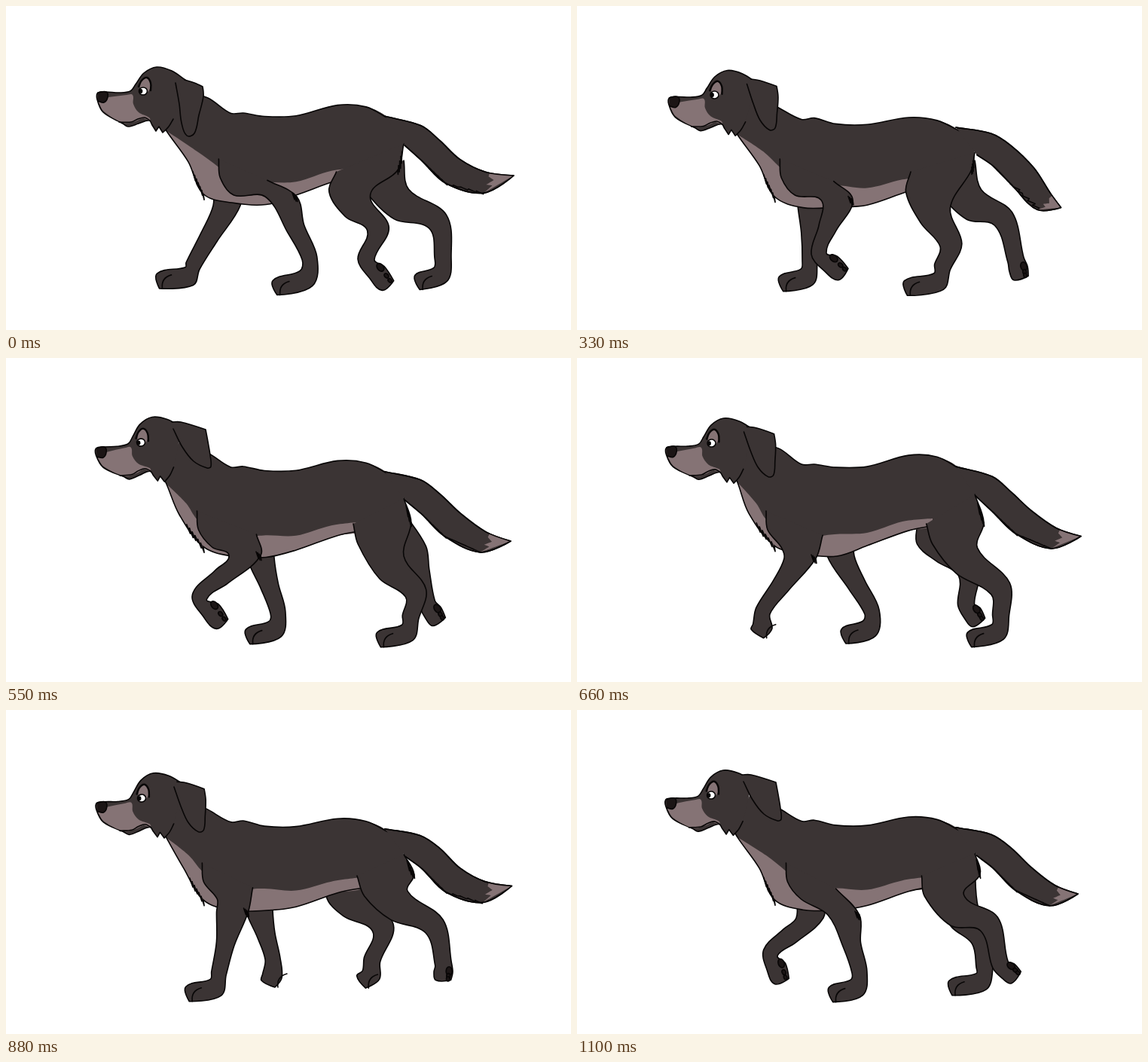
An HTML page with a canvas for the animation above (1.21 s loop, 750x430 px).

```html
<!DOCTYPE html>
<html lang="en">
<head>
<meta charset="utf-8">
<title>Walking dog</title>
<style>
html, body { margin: 0; width: 100%; height: 100%; overflow: hidden; background: #fff; }
canvas { display: block; }
</style>
</head>
<body>
<canvas id="stage" width="750" height="430"></canvas>
<script>
const ctx = document.getElementById('stage').getContext('2d');
const COAT = '#3b3434', TAN = '#857375', DARK = '#1b1515', INK = '#080606';
const STEP = 110, STEPS = 11;

// Joint positions at the key steps of the walk; steps between are interpolated.
const keySteps = [0, 2, 4, 5, 7, 9, 10];
const tracks = {
  // dx, dy, turn, how far the ear is flung back
  head: [[0, 0, 0, 0], [1, 2, .07, 0], [0, 8, -.13, 1], [-3, -1, -.1, 1], [-4, 1, -.03, .15], [0, 7, -.12, 1], [-4, 0, -.06, 1]],
  tailTip: [[674, 225], [658, 247], [627, 288], [670, 243], [668, 230], [675, 237], [665, 244]],
  // elbow, wrist, toe
  nearFore: [
    [365,253, 403,335, 357,374], [356,255, 353,338, 385,366], [334,260, 289,319, 322,346], [317,262, 257,317, 287,353],
    [275,270, 237,354, 192,379], [326,266, 328,345, 290,375], [354,272, 375,348, 337,378]],
  farFore: [
    [293,265, 248,345, 202,365], [300,255, 297,340, 253,367], [321,265, 321,338, 289,371], [338,265, 361,338, 321,370],
    [362,260, 422,336, 387,369], [310,270, 286,324, 309,358], [309,276, 257,322, 272,360]],
  // thigh, hock, ankle, toe
  nearHind: [
    [467,265, 494,296, 478,336, 507,371], [470,272, 476,314, 462,345, 412,374], [482,284, 517,321, 508,348, 461,375], [512,278, 544,312, 537,344, 495,374],
    [523,260, 580,300, 588,339, 547,374], [521,259, 557,274, 573,335, 614,343], [505,266, 547,284, 562,338, 583,355]],
  farHind: [
    [525,263, 573,286, 580,334, 546,367], [526,259, 575,282, 601,336, 577,367], [528,268, 557,283, 564,338, 602,355], [537,258, 548,285, 559,326, 575,350],
    [450,252, 493,285, 474,328, 492,352], [475,262, 508,294, 498,335, 451,370], [515,275, 538,305, 541,342, 496,369]]
};

const pairs = a => a.reduce((out, v, i) => (i % 2 ? out.at(-1).push(v) : out.push([v]), out), []);
const lerp = (a, b, k) => a.map((v, i) => v + (b[i] - v) * k);

function sample(track, t) {
  const i = keySteps.findLastIndex(s => s <= t);
  const from = keySteps[i], to = keySteps[i + 1] ?? STEPS;
  return lerp(track[i], track[(i + 1) % track.length], (t - from) / (to - from));
}

// Smooth path through the points, sharp at the listed corners.
function trace(pts, corners = []) {
  const at = i => pts[Math.max(0, Math.min(pts.length - 1, i))];
  const tangent = i => {
    if (corners.includes(i)) return [0, 0];
    const [ax, ay] = at(i - 1), [bx, by] = at(i + 1), d = Math.hypot(bx - ax, by - ay) || 1;
    return [(bx - ax) / d, (by - ay) / d];
  };
  ctx.beginPath();
  ctx.moveTo(...pts[0]);
  for (let i = 0; i < pts.length - 1; i++) {
    const a = at(i), b = at(i + 1), s = tangent(i), e = tangent(i + 1);
    const d = Math.hypot(b[0] - a[0], b[1] - a[1]) / 3;
    ctx.bezierCurveTo(a[0] + s[0] * d, a[1] + s[1] * d, b[0] - e[0] * d, b[1] - e[1] * d, ...b);
  }
}

function paint(fill, line = true) {
  if (fill) { ctx.fillStyle = fill; ctx.fill(); }
  if (line) ctx.stroke();
}

function shape(pts, fill, corners, line) {
  trace(pts, corners);
  paint(fill, line);
}

function oval(x, y, rx, ry, turn, fill, line) {
  ctx.beginPath();
  ctx.ellipse(x, y, rx, ry, turn, 0, 7);
  paint(fill, line);
}

// Uneven hairs along a to b, each pointing along dx, dy.
function fur(a, b, n, dx, dy, fill = COAT) {
  for (let i = 0; i < n; i++) {
    const p = lerp(a, b, i / n), q = lerp(a, b, (i + 1) / n);
    const size = .6 + .5 * Math.abs(Math.sin(i * 7 + 1));
    ctx.beginPath();
    ctx.moveTo(...p);
    ctx.lineTo(q[0] + dx * size, q[1] + dy * size);
    ctx.lineTo(...q);
    paint(fill);
  }
}

// The two sides of a limb that follows a spine.
function tube(spine, widths, topNormal) {
  const front = [], back = [];
  spine.forEach((p, i) => {
    const a = spine[i - 1] ?? p, c = spine[i + 1] ?? p, d = Math.hypot(c[0] - a[0], c[1] - a[1]);
    const n = !i && topNormal || [(c[1] - a[1]) / d, (a[0] - c[0]) / d], h = widths[i] / 2;
    front.push([p[0] - n[0] * h, p[1] - n[1] * h]);
    back.push([p[0] + n[0] * h, p[1] + n[1] * h]);
  });
  return { front, back };
}

// lead and trail join the two sides of the leg to the body.
function leg(joints, widths, topNormal, lead, trail) {
  const toe = joints.at(-1), wrist = joints.at(-2), planted = toe[0] < wrist[0];
  const heel = planted
    ? [wrist[0] + (toe[0] - wrist[0]) * .1, wrist[1] + (toe[1] - wrist[1]) * .68]
    : lerp(wrist, toe, .5);
  const spine = [...joints.slice(0, -1), heel, toe];
  const { front, back } = tube(spine, widths, topNormal);
  shape([...lead(front[0]), ...front, ...back.toReversed(), ...trail(back[0])], COAT,
    [lead(front[0]).length + front.length]);

  const sole = back.at(-1), heelBack = back.at(-2);
  if (planted) {
    const [x, y] = sole;
    ctx.beginPath();
    ctx.moveTo(x + 4, y);
    ctx.quadraticCurveTo(x + 2, y - 14, x + 16, y - 18);
    ctx.stroke();
  } else {
    const turn = Math.atan2(toe[1] - wrist[1], toe[0] - wrist[0]);
    const pad = (along, rx, ry) => oval(...lerp(lerp(heelBack, sole, along), lerp(heel, toe, along), .4), rx, ry, turn, DARK);
    pad(-.1, 6, 4);
    pad(.5, 3.5, 2.5);
    pad(.85, 3, 2.2);
  }
  return back[0];
}

function foreLeg(track, t, width, lead, trail) {
  const [elbow, wrist, toe] = pairs(sample(track, t));
  return leg([elbow, lerp(elbow, wrist, .52), wrist, toe], [width, 24, 20, 26, 20], [1, 0], lead, trail);
}

function hindLeg(track, t, trail) {
  const joints = pairs(sample(track, t)), x = joints[0][0];
  const lead = () => [[x * .5 + 205, 220], [x * .85 + 32, 247]];
  leg(joints, [44, 29, 22, 25, 20], null, lead, () => trail(x));
}

function drawTail(tip, bob) {
  const third = [593, 223 + bob * 5];
  const fourth = lerp(third, tip, .5);
  const spine = [[540, 177 + bob * 7], [564, 195 + bob * 4], third, [fourth[0] + 2, fourth[1] + 12], tip];
  const { front, back } = tube(spine, [34, 36, 37, 28, 0]);
  const root = [503, 153 + bob * 9];
  const outline = [root, ...back, ...front.toReversed().slice(1)];
  shape(outline, COAT, [5]);
  fur(front[2], front[1], 6, 7, 7);
  fur(front[3], front[2], 5, 9, 4);
  const high = lerp(back[3], tip, .15), edge = k => lerp(front[3], high, k);
  const jag = k => lerp(edge(k), tip, .25);
  shape([high, tip, front[3], jag(.2), edge(.4), jag(.55), edge(.8)], TAN, [0, 1, 2, 3, 4, 5, 6], false);
  shape(outline, null, [5]);
}

// Points are x, resting y and how far y bobs.
const bobbing = (points, bob) => points.map(([x, y, reach]) => [x, y + reach * bob]);

function drawTorso(bob, swing, crease) {
  const back = bobbing([[230, 112, 2], [268, 128, 8], [298, 146, 5], [315, 145, 4], [343, 151, 6], [385, 151, 7],
    [440, 139, 10], [478, 142, 11], [508, 157, 10]], bob);
  const under = bobbing([[475, 231, 9], [440, 238, 9], [385, 257, 8], [345, 265, 2], [300, 264, 4], [262, 251, 2],
    [242 - 14 * Math.max(0, swing), 209, 3], [213, 168, 3], [205, 152, 3]], bob);
  const [corner, front, throat] = under.slice(5);
  shape([...back, [527, 189 + bob * 7], ...under], COAT, [], false);
  ctx.save();
  ctx.clip();
  shape([throat, [246 - 8 * swing, 193], [crease, 214], [crease + 50, 258], [crease + 50, 310], [170, 310], [170, 172]],
    TAN, [0, 3, 4, 5, 6], false);
  const patch = bobbing([[302, 262, 0], [320, 240, 1], [342, 236, 2], [385, 237, 5], [432, 224, 7], [472, 219, 6]], bob);
  shape([...patch, [472, 300], [302, 300]], TAN, [0, 5, 6, 7], false);
  ctx.restore();
  shape(back);
  shape(under);
  fur(lerp(front, corner, .3), corner, 6, 1, 7, TAN);
}

const face = {
  skull: [238,98, 220,86, 200,81, 183,89, 172,104, 165,113, 150,115, 133,114, 122,115, 121,124, 129,141, 155,156, 162,160, 176,156, 190,152, 194,158, 199,166, 203,160, 208,168, 216,160, 222,150],
  muzzle: [136,121, 160,118, 168,118, 169,130, 176,141, 190,148, 191,152, 182,149, 172,153, 156,155, 130,140, 123,128],
  nose: [122,115, 133,114, 135,121, 130,128, 122,126],
  lip: [150,154, 166,154, 175,150, 184,148, 191,152],
  brow: [176,107, 180,99, 187,95, 192,102, 192,112],
  earDown: [237,98, 250,102, 261,107, 262,120, 256,145, 250,169, 240,172, 233,155, 230,130, 225,102],
  earBack: [223,86, 235,86, 268,96, 271,112, 274,130, 275,145, 270,147, 252,138, 237,119, 225,95]
};
for (const part in face) face[part] = pairs(face[part]);

function drawHead([dx, dy, turn, fling]) {
  ctx.save();
  ctx.translate(183 + dx, 112 + dy);
  ctx.rotate(turn);
  ctx.translate(-183, -112);
  shape(face.skull, COAT, [16, 17, 18]);
  shape(face.muzzle, TAN, [], false);
  shape(face.nose, DARK);
  shape(face.lip);
  oval(185, 106, 7, 10, .2, TAN, false);
  oval(182, 113, 5.5, 5, 0, '#fff');
  oval(179, 113, 2.4, 3, 0, INK, false);
  ctx.lineWidth = 2.4;
  shape(face.brow);
  ctx.restore();
  const ear = face.earDown.map((p, i) => lerp(p, face.earBack[i], fling));
  shape(ear.map(([x, y]) => [x + dx, y + dy]), COAT, [2]);
}

function draw(t) {
  const turn = 2 * Math.PI * t / STEPS;
  const bob = Math.cos(2 * turn - 3.88);                         // the body sinks twice per cycle
  const swing = Math.cos(turn - 2 * Math.PI * 6 / STEPS);        // near shoulder, 1 is forward
  const crease = 267 - 16 * swing;
  const rump = [528, 188 + bob * 7];

  ctx.fillStyle = '#fff';
  ctx.fillRect(0, 0, 750, 430);
  ctx.strokeStyle = INK;
  ctx.lineWidth = 1.6;
  ctx.lineCap = ctx.lineJoin = 'round';

  const above = ([x, y]) => [[x, y - 30]];
  hindLeg(tracks.farHind, t, () => [[528, 205]]);
  foreLeg(tracks.farFore, t, 36, above, above);
  drawTorso(bob, swing, crease);
  drawTail(sample(tracks.tailTip, t), bob);

  let seat;
  hindLeg(tracks.nearHind, t, x => [seat = [x * .4 + 333, 218], rump]);
  fur(lerp(rump, seat, .3), seat, 4, 1, 9);

  const shoulder = () => [[crease, 203], [crease + 2, 228], [crease + 20, 251]];
  const elbow = foreLeg(tracks.nearFore, t, 42, shoulder, p => [lerp(p, [330, 222], .7)]);
  fur([elbow[0] - 6, elbow[1] - 5], elbow, 3, 1, 7);
  drawHead(sample(tracks.head, t));
}

function tick() {
  draw(Math.floor(performance.now() / STEP) % STEPS);
  requestAnimationFrame(tick);
}
tick();
</script>
</body>
</html>
```
